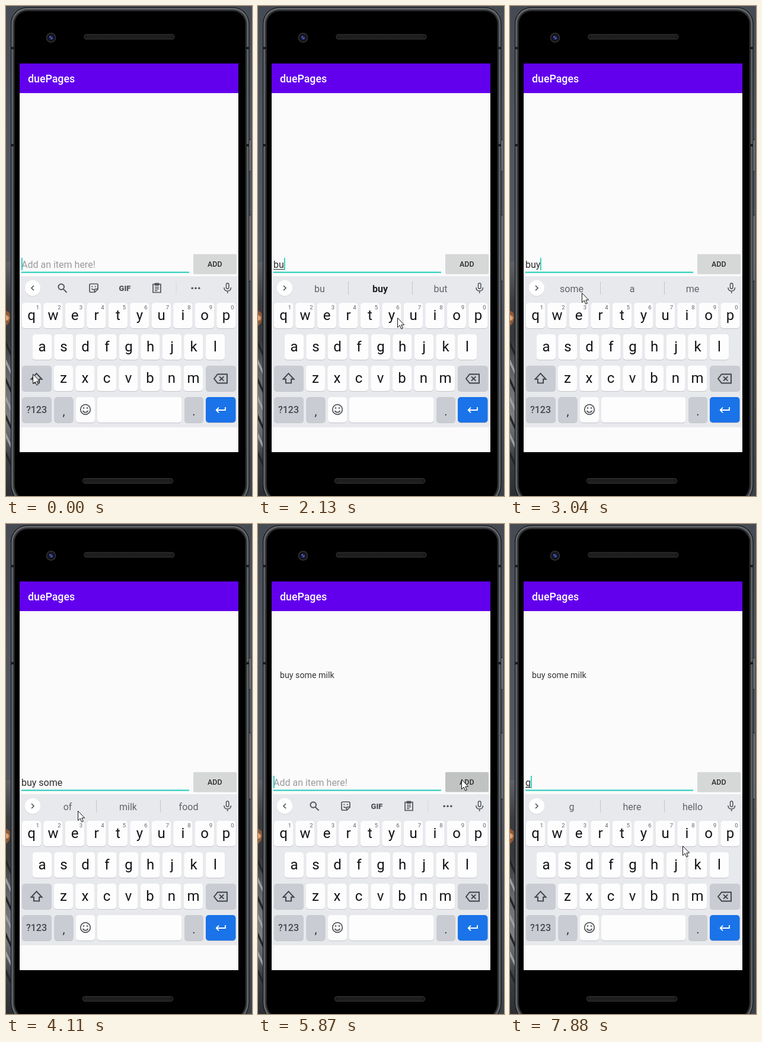
Recreate the animation shown at these times as an HTML page with a canvas. Size 415 px wide and 827 px high, loop 8000 ms.

```html
<!DOCTYPE html>
<html lang="en">
<head>
<meta charset="utf-8">
<title>List app demo</title>
<style>
html, body { margin: 0; width: 100%; height: 100%; overflow: hidden; background: #474c55; }
canvas { display: block; width: 415px; height: 827px; }
</style>
</head>
<body>
<canvas id="stage"></canvas>
<script>
const W = 415, H = 827, LOOP = 8000;
const canvas = document.getElementById('stage');
const ctx = canvas.getContext('2d');
const dpr = window.devicePixelRatio || 1;
canvas.width = W * dpr;
canvas.height = H * dpr;

const TEAL = '#1dcab8', ICON = '#505358', KEY = '#fdfdfe', MOD = '#caccd3';

// Screen refreshes come in bursts: [start, end, count]
const BURSTS = [[120, 1080, 8], [1200, 2130, 8], [2250, 3040, 7], [3470, 3710, 3], [4110, 4650, 5],
  [4930, 5050, 2], [5320, 6260, 7], [6410, 7370, 8], [7490, 7880, 4]];
const TICKS = [0];
for (const [a, b, n] of BURSTS)
  for (let i = 0; i < n; i++) TICKS.push(a + (b - a) * i / (n - 1));

// Pointer tip: [time, x, y]
const PATH = [[0, 45, 621], [120, 52, 624], [530, 140, 645], [940, 239, 623], [1400, 239, 623],
  [1720, 262, 524], [1990, 262, 524], [2130, 235, 526], [2250, 226, 526], [2500, 226, 526],
  [2770, 206, 484], [2900, 206, 484], [3040, 121, 484], [4110, 121, 484], [4370, 206, 488],
  [4650, 206, 488], [4930, 343, 431], [6400, 343, 431], [6684, 143, 566], [6950, 190, 577],
  [7090, 204, 578], [7490, 204, 578], [7880, 291, 543]];

// Field contents: [time, text, composing, suggestions, bold middle]
const FIELD = [
  [-300, '', false, null],
  [1460, 'b', true, ['b', 'be', 'but']],
  [1990, 'bu', true, ['bu', 'buy', 'but'], true],
  [2510, 'buy', true, ['but', 'buy', 'buying'], true],
  [2900, 'buy', false, ['some', 'a', 'me']],
  [3580, 'buy some', false, ['of', 'milk', 'food']],
  [4510, 'buy some milk', false, ['for', 'and', 'is']],
  [5590, '', false, null],
  [7480, 'g', true, ['g', 'here', 'hello']]
];

// Pressed keys and suggestions: [from, to, what]
const PRESSES = [[1075, 1460, 'b'], [1725, 1990, 'u'], [2245, 2510, 'y'], [7225, 7480, 'g']];
const PICKS = [[2770, 2900, 206], [3465, 3580, 104], [4375, 4510, 206]];
const ADD_TIME = 5590;

const ROWS = [['qwertyuiop', 43, 501], ['asdfghjkl', 61, 554], ['zxcvbnm', 97, 607]];
const PITCH = 36.5;

const during = list => t => list.find(([a, b]) => t >= a && t < b);
const pressAt = during(PRESSES), pickAt = during(PICKS);

function box(x, y, w, h, color, r = 0) {
  ctx.fillStyle = color;
  ctx.beginPath();
  ctx.roundRect(x, y, w, h, r);
  ctx.fill();
}

function disc(x, y, r, color) {
  ctx.fillStyle = color;
  ctx.beginPath();
  ctx.arc(x, y, r, 0, Math.PI * 2);
  ctx.fill();
}

function text(s, x, y, size, color, weight = 400, align = 'left') {
  ctx.font = `${weight} ${size}px Roboto, sans-serif`;
  ctx.textAlign = align;
  ctx.fillStyle = color;
  ctx.fillText(s, x, y);
}

// Strokes an SVG path around a centre point
function icon(x, y, d, color = ICON, width = 1.7) {
  ctx.save();
  ctx.translate(x, y);
  ctx.strokeStyle = color;
  ctx.lineWidth = width;
  ctx.stroke(new Path2D(d));
  ctx.restore();
}

function shape(d, color) {
  ctx.fillStyle = color;
  ctx.fill(new Path2D(d));
}

function ramp(x0, y0, x1, y1, ...colors) {
  const g = ctx.createLinearGradient(x0, y0, x1, y1);
  colors.forEach((c, i) => g.addColorStop(i / (colors.length - 1), c));
  return g;
}

function grille(x, y) {
  box(x, y, 153, 9, '#3b3b3b', 4.5);
  box(x + 1, y + 1, 151, 7, '#171717', 3.5);
  ctx.fillStyle = '#383838';
  for (let r = 0; r < 3; r++)
    for (let i = 0; i < 48; i++)
      ctx.fillRect(x + 4 + i * 3 + r % 2 * 1.5, y + 2 + r * 2, 1.3, 1);
}

function drawBackdrop() {
  box(0, 0, W, H, ramp(0, 0, 0, H, '#454a53', '#4f555f', '#525862', '#474c55', '#3c4148'));
  box(0, 432, 12, 395, ramp(0, 432, 0, 827, '#5d6167', '#3a3c40', '#34363a', '#66696d', '#7b7e82', '#3b3e43', '#2c2e32'));
  shape('M0 514L6 518L7 526L5 535L0 540Z', '#8d5a38');
  shape('M0 521L5 525L4 530L0 531Z', '#e0a274');
  // Slanted streaks of light
  for (let i = 0; i < 7; i++) {
    const y = 565 + i * 31;
    shape(`M0 ${y}L9 ${y + 20}V${y + 28}L0 ${y + 9}Z`, i % 2 ? '#9b9ea2' : '#232529');
  }
}

function sideButton(y, h) {
  box(407, y, 6, h, '#1d1e20', 2);
  box(409, y + 1, 3.5, h - 2, ramp(409, 0, 412.5, 0, '#55585b', '#a0a3a6'), 1.5);
}

function drawPhone() {
  drawBackdrop();
  sideButton(225, 55);
  sideButton(352, 113);

  // Nested outlines of the case, from the rim inwards
  const layers = [[0, '#111213'], [1.3, '#707377'], [3, '#484a4d'], [5, '#222324'], [7, '#000']];
  for (const [d, color] of layers)
    box(8 + d, 2 + d, 402.5 - d * 2, 842 - d * 2, color, [28 - d, 28 - d, 36 - d, 36 - d]);
  for (const y of [69, 233])
    for (const x of [8.5, 405]) box(x, y, 5, 4, '#1a1b1c');

  grille(131.5, 47.5);
  grille(129, 797);
  disc(76, 53.5, 8.5, '#2b2b2f');
  disc(76, 53.5, 6.5, '#111219');
  disc(76, 53.5, 3.8, '#1d2352');
  disc(77, 54.5, 1.8, '#4a59b4');
  disc(74.5, 52, 1, '#8f98c9');
}

function drawApp(t, state) {
  const [since, value, composing] = state;
  box(23, 97, 369, 656, '#fbfbfb');
  box(23, 97, 369, 50, '#6200ee');
  text('duePages', 37, 129, 17.8, '#fff', 500);

  if (t >= ADD_TIME) text('buy some milk', 37, 260, 14.22, '#353535');

  box(26, 448.6, 283, 1.8, TEAL);
  if (value) text(value, 26, 442, 16, '#2b2b2b');
  else text('Add an item here!', 26, 442, 16, '#9a9a9a');
  const end = 26 + (value ? ctx.measureText(value).width : 0);
  if (composing) box(26, 444, end - 26, 1, '#2b2b2b');
  if ((t - since) % 1000 < 500) box(Math.round(end), 425, 1.7, 21, TEAL);

  const pressed = t >= 5320 && t < 5850;
  box(316, 419.5, 73, 33.5, 'rgba(0,0,0,.1)', 2);
  box(316, 418.7, 73, 33.3, pressed ? '#c1c2c2' : '#d6d7d7', 2);
  text('ADD', 352.3, 440, 12.45, '#2c2c2c', 500, 'center');
}

function drawTools() {
  icon(95, 476, 'M3 -2A4.8 4.8 0 1 1 -6.6 -2A4.8 4.8 0 1 1 3 -2M1.6 1.6L7.6 7.6', ICON, 2);
  icon(148, 476, 'M-5 -7H5Q7 -7 7 -5V2L2 7H-5Q-7 7 -7 5V-5Q-7 -7 -5 -7M7 1.5H3.5Q1.5 1.5 1.5 3.5V7M-3.5 1Q-2 3.2 .5 2.4');
  disc(145.3, 473.5, 1.1, ICON);
  disc(150.7, 473.5, 1.1, ICON);
  text('GIF', 200.5, 480.5, 13, ICON, 900, 'center');
  icon(254.5, 476, 'M-6.5 -6.5H6.5V7.5H-6.5ZM-3.5 -1.5H3.5M-3.5 1.5H3.5M-3.5 4.5H1');
  box(250.5, 467.5, 8, 4.5, ICON, 1);
  box(286.5, 466, 1, 20, '#d3d5d9');
  for (const x of [314.2, 320, 325.8]) disc(x, 476.2, 1.8, ICON);
}

function drawSuggestions(t, words, bold) {
  const pick = pickAt(t);
  if (pick) box(pick[2] - 46, 458, 92, 38, '#d6d8dd', 5);
  for (const x of [152, 260]) box(x, 465, 1, 22, '#c3c5c9');
  words.forEach((word, i) => {
    const strong = bold && i === 1;
    text(word, 104 + i * 102, 482.5, 16, strong ? '#202124' : '#5f6368', strong ? 700 : 400, 'center');
  });
}

function key(x, y, w, color = KEY) {
  box(x, y + 1, w, 43, '#c3c5ca', 5);
  box(x, y, w, 43, color, 5);
}

function drawKeyboard(t, words, bold) {
  box(23, 456, 369, 255, '#e8e9ed');
  disc(45, 477, 13.4, '#d9dade');
  disc(45, 476, 13.2, '#fff');
  icon(45, 476, words ? 'M-2 -4L2 0L-2 4' : 'M2 -4L-2 0L2 4');
  if (words) drawSuggestions(t, words, bold);
  else drawTools();

  icon(373.7, 476, 'M-2.2 -6A2.2 2.2 0 0 1 2.2 -6V-1A2.2 2.2 0 0 1 -2.2 -1ZM-5.8 -1Q-5.8 5 0 5Q5.8 5 5.8 -1M0 5V9', ICON, 1.5);

  ROWS.forEach(([letters, x0, y], r) => {
    [...letters].forEach((ch, i) => {
      const x = x0 + i * PITCH;
      key(x - 16.3, y, 32.4);
      text(ch, x, y + 29, 24, '#121315', 400, 'center');
      if (r === 0) text((i + 1) % 10, x + 10.5, 512, 9.5, '#5f6368', 400, 'center');
    });
  });

  key(27, 607, 50, MOD);
  icon(51.5, 629, 'M0 -8.8L9 .8H4.6V7.4H-4.6V.8H-9Z', '#3f4247', 1.9);
  key(337, 607, 51, MOD);
  icon(362, 629, 'M-11 0L-5 -7.5H11V7.5H-5ZM-2 -3.7L5.4 3.7M5.4 -3.7L-2 3.7', '#3f4247', 1.9);

  key(27, 660, 50, MOD);
  text('?123', 51.5, 687, 16, '#44474c', 500, 'center');
  key(81.5, 660, 32, MOD);
  text(',', 97.5, 691, 20, '#2d2f33', 400, 'center');
  key(118, 660, 32);
  icon(134, 681, 'M8.3 0A8.3 8.3 0 1 1 -8.3 0A8.3 8.3 0 1 1 8.3 0M-4.4 2Q-3 4.8 0 4.8Q3 4.8 4.4 2');
  disc(131, 678.5, 1.3, ICON);
  disc(137, 678.5, 1.3, ICON);
  key(154, 660, 142.5);
  key(301, 660, 32, MOD);
  text('.', 316.8, 691, 20, '#2d2f33', 400, 'center');
  key(337, 660, 50.5, '#1a73e8');
  icon(362, 682, 'M8 -5V0H-7M-3 -4.3L-7.3 0L-3 4.3', '#fff', 1.8);

  const press = pressAt(t);
  if (press) drawPopup(press[2]);
}

function drawPopup(ch) {
  const [letters, x0, y] = ROWS.find(row => row[0].includes(ch));
  const x = x0 + letters.indexOf(ch) * PITCH;
  ctx.save();
  ctx.shadowColor = 'rgba(0,0,0,.28)';
  ctx.shadowBlur = 3 * dpr;
  ctx.shadowOffsetY = dpr;
  box(x - 18, y - 62, 37, 105, MOD, 5);
  ctx.restore();
  text(ch, x, y - 29, 24, '#121315', 400, 'center');
}

function drawPointer(t) {
  let i = PATH.length - 1;
  while (i > 0 && PATH[i][0] > t) i--;
  const [t0, x0, y0] = PATH[i];
  const [t1, x1, y1] = PATH[i + 1] || [t0 + 1, x0, y0];
  const k = (t - t0) / (t1 - t0);
  const mix = (a, b) => Math.round(a + (b - a) * k);
  ctx.save();
  ctx.translate(mix(x0, x1) + .5, mix(y0, y1) + .5);
  const arrow = new Path2D('M0 0V16L3.7 12.5L6.3 18.5L8.8 17.4L6.3 11.6H11.2Z');
  ctx.fillStyle = '#fff';
  ctx.fill(arrow);
  ctx.strokeStyle = '#111';
  ctx.lineWidth = 1;
  ctx.stroke(arrow);
  ctx.restore();
}

function draw(time) {
  const t = TICKS.findLast(tick => tick <= time);
  const state = FIELD.findLast(entry => entry[0] <= t);
  ctx.setTransform(dpr, 0, 0, dpr, 0, 0);
  drawPhone();
  drawApp(t, state);
  drawKeyboard(t, state[3], state[4]);
  drawPointer(t);
}

const start = performance.now();
function loop() {
  draw((performance.now() - start) % LOOP);
  requestAnimationFrame(loop);
}
loop();
</script>
</body>
</html>
```
